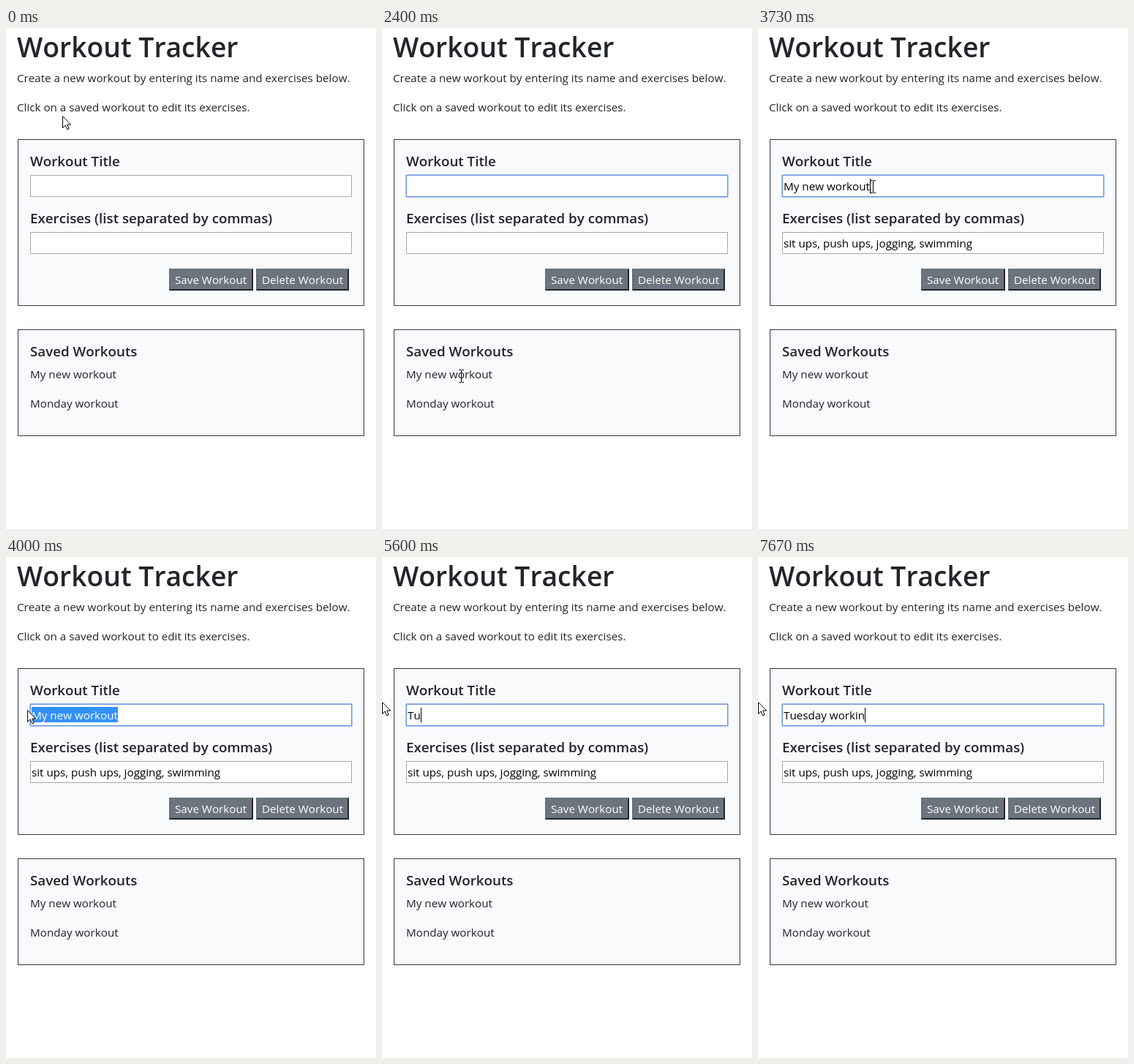
These frames come from a looping animation (506x685 px, 8 s). An HTML page:

```html
<!DOCTYPE html>
<html lang="en">
<head>
<meta charset="utf-8">
<title>Workout Tracker</title>
<style>
  html, body { margin: 0; width: 100%; height: 100%; overflow: hidden; background: #fff; }
  svg { display: block; }
  text { font: 15.2px "Open Sans", "Noto Sans", sans-serif; font-kerning: none; fill: #212529; white-space: pre; }
  .h1 { font-size: 37.3px; font-weight: 600; }
  .h5 { font-size: 18.75px; font-weight: 600; }
  .card { fill: #f8fafc; stroke: #343a40; }
  .input { fill: #fff; stroke: #a9a9a9; }
  .value { fill: #000; }
  .label, #selected { fill: #fff; }
  #ring { fill: none; stroke: #a3bfec; }
  #ring rect + rect { stroke: #7297d9; }
</style>
</head>
<body>
<svg width="506" height="685">
  <text class="h1" x="15" y="40">Workout Tracker</text>
  <text x="15" y="74">Create a new workout by entering its name and exercises below.</text>
  <text x="15" y="114">Click on a saved workout to edit its exercises.</text>

  <rect class="card" x="16.5" y="152.5" width="473" height="227"/>
  <text class="h5" x="33" y="189">Workout Title</text>
  <rect class="input" x="33.5" y="201.5" width="439" height="29"/>
  <text class="h5" x="33" y="267">Exercises (list separated by commas)</text>
  <rect class="input" x="33.5" y="279.5" width="439" height="29"/>

  <path fill="#212529" d="M223 329h115v30h-115zM342 329h127v30h-127z"/>
  <path fill="#65717d" d="M223 329h115l-2 2v26h-111l-2 2zM342 329h127l-2 2v26h-123l-2 2z"/>
  <path fill="#6c757d" d="M225 331h111v26h-111zM344 331h123v26h-123z"/>
  <text class="label" x="231" y="350">Save Workout</text>
  <text class="label" x="350" y="350">Delete Workout</text>

  <rect class="card" x="16.5" y="412.5" width="473" height="145"/>
  <text class="h5" x="33" y="449">Saved Workouts</text>
  <text x="33" y="479">My new workout</text>
  <text x="33" y="519">Monday workout</text>

  <g id="ring">
    <rect x="32.5" y="200.5" width="441" height="31" rx="1"/>
    <rect x="33.5" y="201.5" width="439" height="29"/>
  </g>
  <rect id="highlight" y="205" height="21" fill="#3390ff"/>
  <text class="value" x="35" y="222"><tspan id="plain"></tspan><tspan id="selected"></tspan></text>
  <text class="value" id="exercises" x="35" y="300">sit ups, push ups, jogging, swimming</text>
  <rect id="caret" y="206" width="1" height="20"/>

  <path id="arrow" fill="#fff" stroke="#000" d="M.5 .7V16.5L4.2 13L6.8 18.9L9.2 17.9L6.7 12H11.5Z"/>
  <path id="beam" fill="none" stroke="#000" d="M-3 -8.5H0M1 -8.5H4M.5 -8V8M-3 8.5H0M1 8.5H4"/>
</svg>
<script>
const el = id => document.getElementById(id);
const show = (id, on) => el(id).setAttribute('visibility', on ? 'visible' : 'hidden');
const clamp = v => Math.max(0, Math.min(1, v));
const ramp = (tick, start, length) => clamp((tick - start) / length);

// All times below are in ticks of 1/15 s
const LOOP = 8000, TICK = 1000 / 15;
const FOCUS = 12, BLUR = 38, LOAD = 40, DRAG = 56, TYPE = 76, BLINK = 8;
const SAVED = 'My new workout', TYPED = 'Tuesday workin', TEXT_LEFT = 35;

// Pointer moves: start, length, then where it arrives
const moves = [
  [2, 6, 107, 217], [18, 8, 112, 481], [27, 4, 108, 476], [45, 3, 189, 192],
  [48, 5, 157, 217], [56, 4, 29, 209], [60, 2, 0, 209], [74, 2, 0, 198]
];

function pointerAt(tick) {
  let x = 77, y = 120;
  for (const [start, length, toX, toY] of moves) {
    const k = ramp(tick, start, length);
    x += (toX - x) * k;
    y += (toY - y) * k;
  }
  return [Math.round(x), Math.round(y)];
}

// Slow start, a quick burst, then a steady pace
function typedCount(tick) {
  if (tick < TYPE) return 0;
  return Math.floor(1 + 4 * ramp(tick, 80, 16) + 2 * ramp(tick, 96, 3) + 7 * ramp(tick, 99, 16));
}

function drawField(tick, pointerX) {
  const typed = typedCount(tick);
  const dragging = tick >= DRAG && !typed;
  const value = typed ? TYPED.slice(0, typed) : tick >= LOAD ? SAVED : '';
  const plain = el('plain'), selected = el('selected'), highlight = el('highlight');

  plain.textContent = value;
  selected.textContent = '';
  if (dragging) {
    const reach = clamp((pointerX - TEXT_LEFT) / plain.getComputedTextLength());
    const split = Math.round(reach * value.length);
    plain.textContent = value.slice(0, split);
    selected.textContent = value.slice(split);
  }
  const start = TEXT_LEFT + plain.getComputedTextLength();
  highlight.setAttribute('x', start);
  highlight.setAttribute('width', selected.getComputedTextLength());

  const focused = tick >= FOCUS && tick < BLUR || tick >= DRAG;
  const blinkOn = tick >= DRAG || Math.floor((tick - FOCUS) / BLINK) % 2 === 0;
  el('caret').setAttribute('x', Math.round(start));
  show('caret', focused && blinkOn && !selected.textContent);
  show('ring', focused);
  show('exercises', tick >= LOAD);
}

function drawPointer(x, y) {
  const overText = [...document.querySelectorAll('text, .input')].some(node => {
    const box = node.getBBox();
    return x >= box.x && x < box.x + box.width && y >= box.y && y < box.y + box.height;
  });
  show('beam', overText);
  show('arrow', !overText);
  el(overText ? 'beam' : 'arrow').setAttribute('transform', `translate(${x} ${y})`);
}

function frame() {
  const tick = Math.floor((performance.now() % LOOP + 4) / TICK);
  const [x, y] = pointerAt(tick);
  drawField(tick, x);
  drawPointer(x, y);
  requestAnimationFrame(frame);
}
frame();
</script>
</body>
</html>
```
